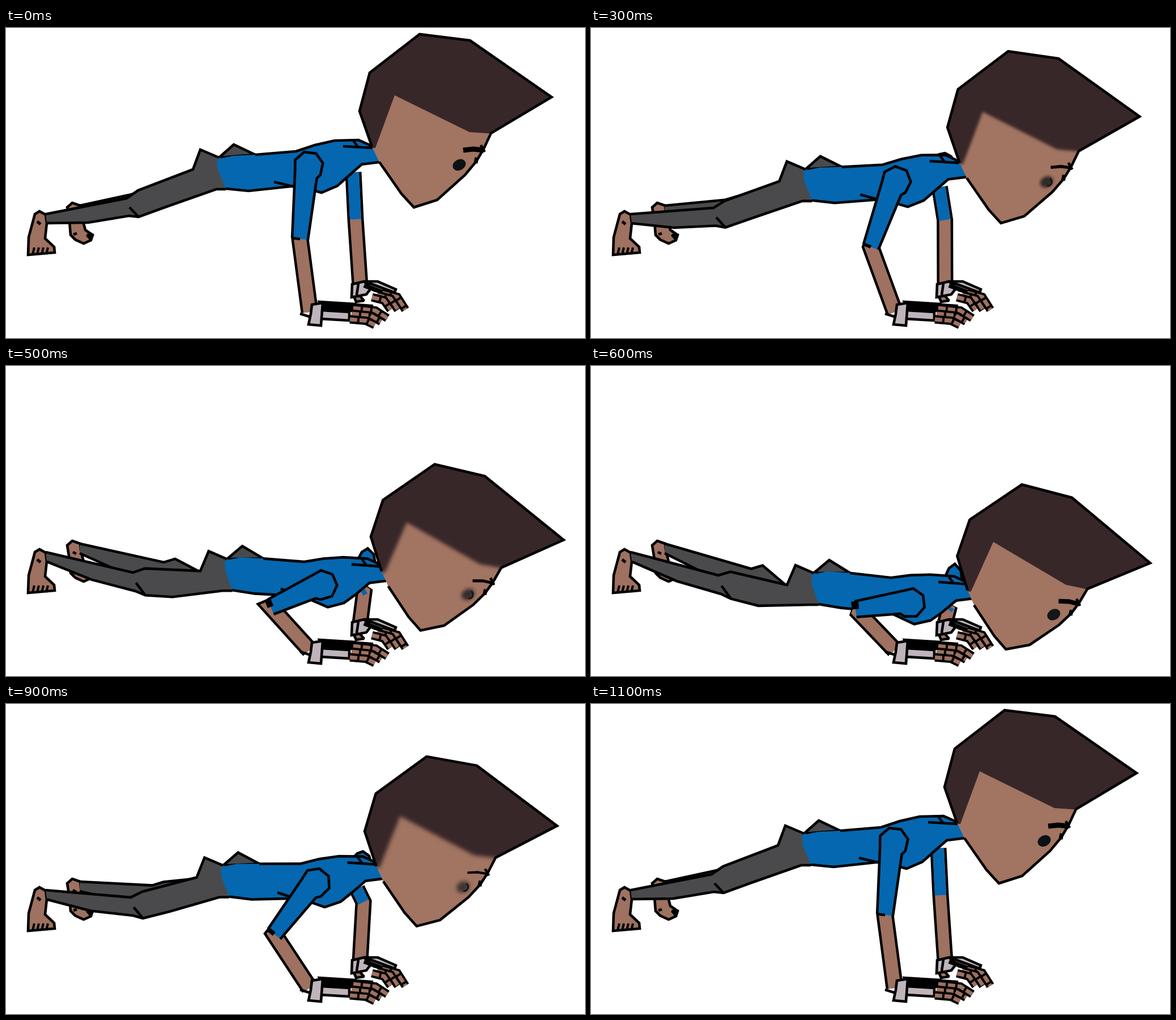
Animation of 1022 by 548 pixels, one loop 1.2 s. Source, as an HTML page with a canvas:

```html
<!DOCTYPE html>
<html lang="en">
<head>
<meta charset="utf-8">
<title>Push-up</title>
<style>
  html, body { margin: 0; width: 100%; height: 100%; overflow: hidden; background: #fff; }
  canvas { display: block; width: 100vw; height: 100vh; }
</style>
</head>
<body>
<canvas id="stage" width="1022" height="548"></canvas>
<script>
const ctx = document.getElementById('stage').getContext('2d');
const FACE = '#a27462', SKIN = '#9e7161', HAIR = '#382729', SHIRT = '#0567af';
const PANTS = '#4a4a4c', BAND = '#bfb4bb', INK = '#000';

const clamp = (v, lo, hi) => Math.min(hi, Math.max(lo, v));
const mix = (a, b, k) => a + (b - a) * k;
const ease = s => (1 - Math.cos(Math.PI * s)) / 2;
const parse = s => s.split(' ').map(p => p.split(',').map(Number));

// Pose of the current moment, 0 (arms straight) to 1 (chest down).
let depth, kneeDrop, speed, drift;

function setPose(time) {
  const down = clamp((time - 190) / 433, 0, 1);
  const up = clamp((time - 703) / 353, 0, 1);
  depth = ease(down) - ease(up);
  kneeDrop = depth * (1.75 - .75 * depth);
  speed = Math.sin(Math.PI * (up || down));
  drift = up ? 0 : 2.5 * speed;
}

// Moves a point of the straight-armed body to its place in the current pose.
function bendBody([x, y]) {
  const shin = clamp((x - 70) / 155, 0, 1), thigh = clamp((x - 230) / 100, 0, 1);
  const trunk = clamp(135 + .2 * (x - 400), 138, 175);
  return [
    x + mix(13 * kneeDrop * shin, (31 - .06 * y) * depth, thigh),
    y + mix(75 * kneeDrop * shin, trunk * depth, thigh)
  ];
}

function bendHead([x, y]) {
  const ahead = x - 730;
  const drop = 200 + Math.max(.03 * ahead, .143 * ahead) - .048 * (y - 10);
  return [x + (31 - .06 * y) * depth + drift, y + drop * depth];
}

const body = s => parse(s).map(bendBody);
const face = s => parse(s).map(bendHead);

function trace(pts, closed) {
  ctx.beginPath();
  pts.forEach(([x, y]) => ctx.lineTo(x, y));
  if (closed) ctx.closePath();
}
function fill(pts, color) {
  trace(pts, true);
  ctx.fillStyle = color;
  ctx.fill();
}
function line(pts, width = 4.6, color = INK) {
  trace(pts);
  ctx.lineWidth = width;
  ctx.strokeStyle = color;
  ctx.stroke();
}
function shape(pts, color) {
  fill(pts, color);
  trace(pts, true);
  ctx.lineWidth = 4.6;
  ctx.strokeStyle = INK;
  ctx.stroke();
}
const fixed = (s, color) => shape(parse(s), color);
const mark = (s, width) => line(parse(s), width);

function limb(joints, width) {
  line(joints, width + 9);
  line(joints, width, SKIN);
}

function drawFeet() {
  fixed('108,317 117,309 131,314 132,326 140,357 153,366 150,375 137,381 122,374 114,366 112,342', SKIN);
  mark('118,329 124,332');
  mark('119,365 125,363');
  fixed('143,366 152,366 149,373', INK);
}

function drawLegs() {
  const knee = [222 + 61 * kneeDrop, 294 + 65 * depth];
  const [hip, under] = body('330,252 235,312');
  const top = [[130, 314], knee, [knee[0] + 20, knee[1] - 6], hip];
  fill([...top, under, [130, 331]], PANTS);
  line(top);
  line([under, [130, 331]]);

  fixed('39,401 40,370 51,329 59,324 70,330 72,345 69,372 85,387 86,397', SKIN);
  for (let x = 47; x < 72; x += 8) mark(`${x},400 ${x + 3},388`, 4);
  mark('55,342 61,347', 5);

  shape(body('376,229 402,206 440,224'), PANTS);
  const upper = body('70,329 213,301 233,287 330,250 343,215 376,229');
  const lower = body('388,285 371,285 283,316 234,334 217,332 145,344 72,345');
  fill([...upper, ...body('405,235 405,284'), ...lower], PANTS);
  line(upper);
  line(lower);
  line(body('234,334 218,317'));
}

function drawFarArm() {
  const [shoulder] = body('613,255');
  const elbow = [617 + 16 * (1 - (1 - depth) ** 4), 338 + 87 * depth ** 2.2];
  limb([shoulder, elbow, [625, 455]], 20);
  line([shoulder, elbow], 20, SHIRT);
}

function drawTorso() {
  const lift = 22 * depth;
  shape(body(`606,199 612,${199 - lift * .7} 622,${198 - lift} 633,${203 - lift * .7} 638,212`), SHIRT);
  const back = body('440,224 512,218 545,207 580,199 622,198 640,206 648,212');
  const belly = body('660,237 628,241 604,262 585,279 557,291 512,279 428,288 388,284');
  fill([...body('372,232 400,226'), ...back, ...body('672,222 672,240'), ...belly, ...body('374,250')], SHIRT);
  line(back);
  line(belly);
  line(body('595,209 646,212'));
  line(body('613,199 621,210'));
  line(body('473,272 510,281'));
}

function drawHead() {
  const smear = 4 * speed, moving = speed > .4;
  const soft = smear > .1 ? `blur(${smear}px)` : 'none';
  const outline = face('659,237 698,293 720,317 761,304 810,260 830,236 843,214 856,186 963,122 819,22 730,11 664,62 642,79 624,147 646,210');
  fill(outline, FACE);
  ctx.save();
  trace(outline, true);
  ctx.clip();
  ctx.filter = soft;
  fill(face('652,212 686,119 818,184 862,187 1010,120 830,-10 720,-15 630,50 600,147 635,212'), HAIR);
  ctx.restore();

  const [[x, y]] = face('800,242');
  ctx.save();
  ctx.filter = soft;
  ctx.globalAlpha = 1 - .35 * speed;
  ctx.fillStyle = '#0b1114';
  ctx.beginPath();
  ctx.ellipse(x, y, 12, 9.5, -.5, 0, Math.PI * 2);
  ctx.fill();
  ctx.restore();
  if (moving) {
    ctx.beginPath();
    ctx.arc(x + 2, y, 7, -1, 1.8);
    ctx.lineWidth = 3;
    ctx.strokeStyle = '#11181c';
    ctx.stroke();
  }
  line(face('807,216 825,214 843,216'), 9 - 5 * speed);
  line(face('838,207 845,219'));
  line(outline);
  line(face('831,229 829,239'), 7);
}

function drawNearArm() {
  const shoulder = [mix(534, 564, depth), mix(244, 420, depth)];
  const elbow = [519 - 52 * (1 - (1 - depth) ** 4), 373 + 57 * kneeDrop];
  const [dx, dy] = [elbow[0] - shoulder[0], elbow[1] - shoulder[1]];
  const reach = Math.hypot(dx, dy);
  limb([shoulder, elbow, [536, 502]], 22);
  mark('519,505 538,511');

  // The sleeve lies along the x axis, with part of an octagon round the shoulder.
  const sleeve = [[reach, 14]];
  for (let i = 0; i < 6; i++) {
    const a = (60 + 48 * i) * Math.PI / 180;
    sleeve.push([26 * Math.cos(a), 26 * Math.sin(a)]);
  }
  sleeve.push([20, -17], [reach, -14]);
  ctx.save();
  ctx.translate(...shoulder);
  ctx.rotate(Math.atan2(dy, dx));
  fill(sleeve, SHIRT);
  line(sleeve);
  line([[reach, 14], [reach, 0]], 4.6 + 8 * depth);
  ctx.restore();
}

function finger(x, y, length, drop) {
  const pts = [[x, y], [x + length * .65, y + drop * .25], [x + length, y + drop]];
  line(pts, 15);
  ctx.setLineDash([13, 4]);
  line(pts, 7, SKIN);
  ctx.setLineDash([]);
}

function drawHands() {
  fixed('612,470 625,474 632,482 618,484', SKIN);
  fixed('611,453 632,448 646,458 636,471 610,476', BAND);
  fixed('632,448 656,448 688,462 686,468 650,464', BAND);
  mark('622,452 619,472');
  mark('638,450 684,467');
  mark('632,455 672,470', 8);
  for (let i = 0; i < 3; i++) finger(664 - 9 * i, 468 + 4 * i, 41 - 4 * i, 30 - 4 * i);

  fixed('553,484 618,488 610,500 558,497', INK);
  fixed('556,499 606,502 606,517 556,514', BAND);
  fixed('540,489 559,486 556,526 534,524 538,505', BAND);
  mark('610,489 648,492', 6);
  for (let i = 0; i < 3; i++) finger(613 - 3 * i, 495 + 10 * i, 60 - 8 * i, 18 - 4 * i);
}

function draw(time) {
  setPose(time);
  ctx.fillStyle = '#fff';
  ctx.fillRect(0, 0, 1022, 548);
  ctx.miterLimit = 2;
  drawFeet();
  drawLegs();
  drawFarArm();
  drawTorso();
  drawHead();
  drawNearArm();
  drawHands();
}

const start = performance.now();
function tick() {
  const time = (performance.now() - start) % 1200;
  draw(Math.floor(time / 100) * 100);
  requestAnimationFrame(tick);
}
tick();
</script>
</body>
</html>
```
